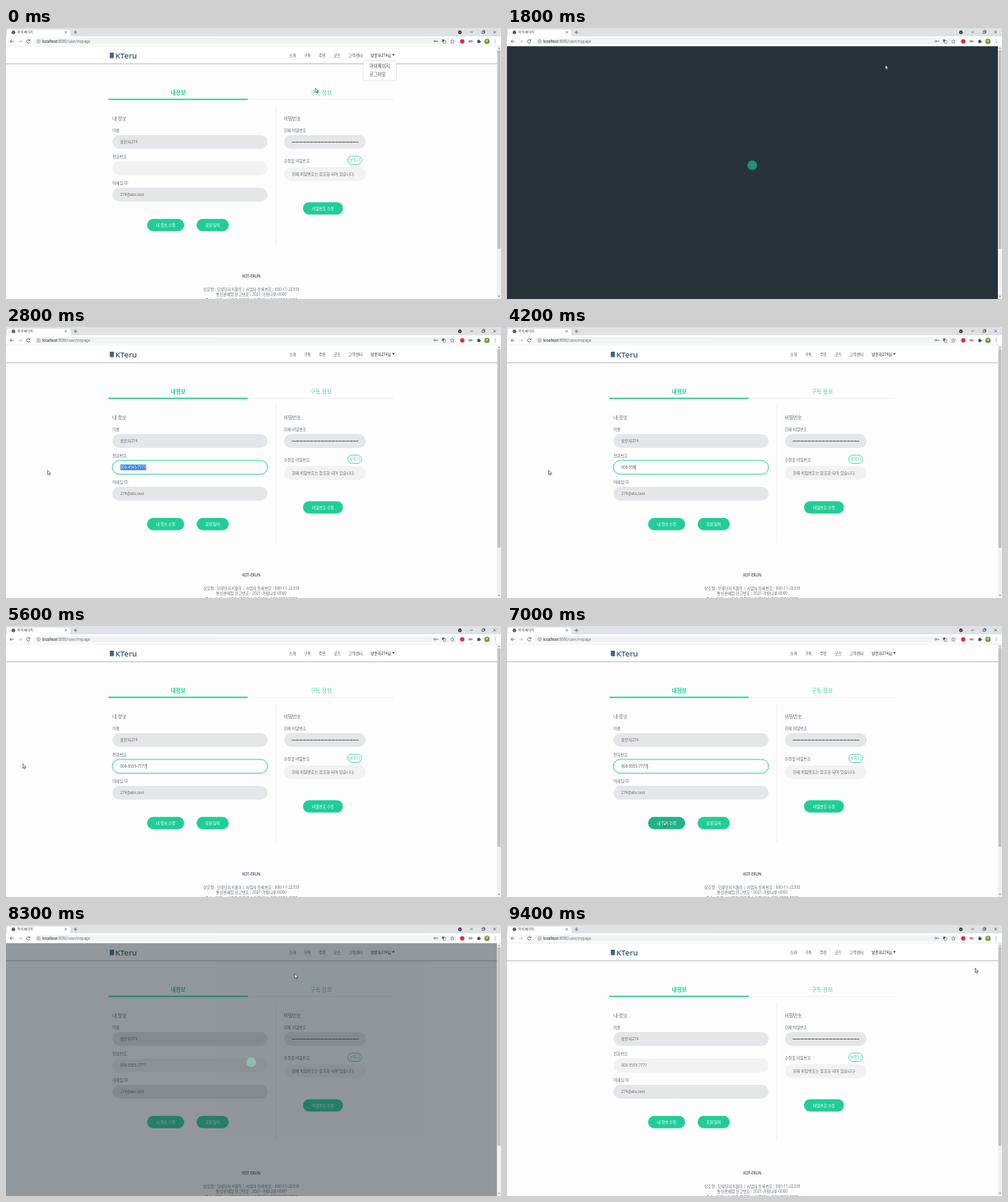
Write an HTML page that moves like this. It is 600 px wide and 329 px high and loops after 9500 ms.

```html
<!DOCTYPE html>
<html>
<head>
<meta charset="utf-8">
<title>마이페이지</title>
<style>
  html, body { margin: 0; width: 100%; height: 100%; overflow: hidden; background: #fdfdfd; }
  svg { display: block; width: 100vw; height: 100vh; }
  text { font-family: "Open Sans", "Noto Sans CJK KR", "Noto Sans CJK", sans-serif; white-space: pre; }
  .ui text { font-family: Roboto, "Noto Sans CJK KR", "Noto Sans CJK", sans-serif; }
</style>
</head>
<body>
<svg id="stage" viewBox="0 0 600 329" preserveAspectRatio="none"></svg>
<script>
const LOOP = 9500, STEP = 100;
const GREEN = '#20cd98', DARK_GREEN = '#1fb388', INK = '#626a76', GREY = '#e4e6ea', PALE = '#f2f2f2';
const OLD_PHONE = '000-4545-7777', NEW_PHONE = '000-5555-7777';

const text = (x, y, s, size = 4.7, fill = INK, extra = '') =>
  `<text x="${x}" y="${y}" font-size="${size}" fill="${fill}" ${extra}>${s}</text>`;
const mid = (x, y, s, size, fill, extra = '') => text(x, y, s, size, fill, 'text-anchor="middle" ' + extra);
const rect = (x, y, w, h, fill, extra = '') =>
  `<rect x="${x}" y="${y}" width="${w}" height="${h}" fill="${fill}" ${extra}/>`;
const pill = (x, y, w, h, fill, extra = '') => rect(x, y, w, h, fill, `rx="${h / 2}" ` + extra);
const dot = (x, y, r, fill, extra = '') => `<circle cx="${x}" cy="${y}" r="${r}" fill="${fill}" ${extra}/>`;
const line = (d, stroke = '#5f6368', w = 0.7, extra = '') =>
  `<path d="${d}" fill="none" stroke="${stroke}" stroke-width="${w}" ${extra}/>`;
const group = (id, body) => `<g id="${id}">${body}</g>`;
const button = (x, y, w, h, s, id = '') =>
  pill(x, y, w, h, GREEN, id && `id="${id}"`) + mid(x + w / 2, y + h / 2 + 1.7, s, 4.6, '#fff');

const header =
  rect(0, 22, 595, 21.2, '#fff') + rect(0, 42.9, 595, 0.9, '#b9bbbe') +
  rect(125.8, 30, 5, 6.6, '#3f6488') +
  text(132.6, 36.5, 'KTeru', 9.4, '#315378', 'font-weight="600"') +
  [[343, '소개'], [361, '구독'], [379, '주민'], [397, '굿즈'], [415, '고객센터']]
    .map(([x, s]) => text(x, 34.5, s, 4.75, '#50555d')).join('') +
  text(442, 34.5, '방문자274님', 4.6, '#202328', 'font-weight="500"') +
  '<path d="M468 31.8h3.2l-1.6 1.9z" fill="#222"/>';

const tabs =
  rect(124, 86.6, 346, 0.6, '#e3e5e7') + rect(124, 85.8, 169, 1.6, GREEN) +
  mid(208.8, 80.8, '내정보', 6.6, GREEN, 'font-weight="700"') +
  mid(382, 80.8, '구독 정보', 6.6, '#45d5aa');

const form =
  text(129, 112.2, '내 정보', 5.6) + text(129, 125.8, '이름') +
  pill(129, 130, 188, 16.8, GREY) + text(138.5, 140.2, '방문자274') +
  text(129, 157.6, '전화번호') +
  pill(129, 162, 188, 16.8, PALE, 'id="field"') +
  rect(138.5, 167, 0, 6.8, '#3a86e8', 'id="sel"') +
  text(138.5, 172.1, '', 4.5, INK, 'id="phone"') +
  rect(0, 167.3, 0.5, 6.2, '#222', 'id="caret"') +
  text(129, 189.6, '이메일 ID') +
  pill(129, 194, 188, 16.8, GREY) + text(138.5, 204.1, '274@abc.test', 4.6) +
  button(171, 231.8, 45, 15, '내 정보 수정', 'save') +
  button(231, 231.8, 39, 15, '회원 탈퇴') +
  rect(326.8, 94, 0.6, 168, '#e4e5e8');

const password =
  text(336.8, 112.2, '비밀번호', 5.6) + text(336.8, 125.8, '현재 비밀번호') +
  pill(337, 130, 99, 16.8, GREY) +
  line('M346.5 138.5H427', '#50555d', 1, 'stroke-dasharray="1.1 .2"') +
  text(336.8, 163.2, '수정할 비밀번호') +
  pill(414.3, 155.6, 16.8, 10, '#fff', `stroke="${GREEN}" stroke-width=".7"`) +
  mid(422.7, 162.2, '보이기', 4.6, GREEN) +
  pill(337, 169, 99, 16.8, PALE) +
  text(346.5, 179, '현재 비밀번호는 암호화 되어 있습니다.', 4.75) +
  button(360, 211.4, 48.4, 15, '비밀번호 수정');

const footer =
  mid(297.3, 302.6, 'KOT-ERUN', 4.5, '#47505c', 'font-weight="600"') +
  mid(297.3, 318.8, '상호명 : 모루단지 K풀이 | 사업자 등록번호 : 000-11-22333', 4.7, INK) +
  mid(297.3, 325.2, '통신판매업 신고번호 : 2021-가람나루-0000', 4.7, INK) +
  mid(297.3, 331.7, '주소 : 가람시 나루구 모루로 | 고객센터 : 000-0000-0000', 4.7, INK);

const menu =
  rect(433, 39.5, 40.3, 24.5, '#fff', 'rx="1" stroke="#d5d7da" stroke-width=".6"') +
  text(440.8, 47.8, '마이페이지', 5.3, '#3a3e44') + text(440.8, 58, '로그아웃', 5.3, '#3a3e44');

const key = x => dot(x - 1.3, 16, 1, 'none', 'stroke="#5f6368" stroke-width=".7"') + line(`M${x - 0.3} 16h2.7v1`);
const chrome =
  rect(0, 0, 600, 10.5, '#dee1e6') + '<path d="M1 10.5V4q0-2 2-2H76q2 0 2 2v6.5z" fill="#fff"/>' +
  rect(0, 10.2, 600, 11.8, '#fff') + rect(0, 21.7, 600, 0.5, '#d8dadd') +
  pill(34, 12.3, 512, 7.8, '#f1f3f4') +
  text(14, 6.7, '마이페이지', 4.1, '#45494d') +
  line('M71.2 3.8l2.6 2.6m0-2.6l-2.6 2.6M82 5.2h4.4M84.2 3v4.4', '#44474b', 0.6) +
  dot(550.2, 5.2, 2.2, '#33363a') + line('M549.2 4.8l1 1 1-1', '#fff', 0.5) +
  line('M562.5 5h3.4M577 4h2.6v2.6h-2.6zM578 4v-.9h2.5v2.6h-.9M590.8 3.5l3 3m0-3l-3 3', '#33363a', 0.6) +
  line('M9.4 16.2H4.9l2-2m-2 2l2 2', '#4c5054') +
  line('M14.8 16.2h4.5l-2-2m2 2l-2 2', '#b4b7bb') +
  dot(39.5, 16.2, 1.9, 'none', 'stroke="#5f6368" stroke-width=".5"') + line('M39.5 15.9v1.3m0-2.2v.4', '#5f6368', 0.5) +
  text(44, 17.7, '<tspan fill="#25282c">localhost</tspan>:8080/user/mypage', 4.5, '#74787d') +
  '<path d="M541 13.9l.7 1.5 1.6.2-1.2 1.1.3 1.6-1.4-.8-1.4.8.3-1.6-1.2-1.1 1.6-.2z" fill="none" stroke="#5f6368" stroke-width=".5"/>' +
  dot(553, 16.2, 2.6, '#dd2a36') +
  dot(562, 16.2, 1, 'none', 'stroke="#444" stroke-width=".6"') + dot(564.3, 16.2, 1, 'none', 'stroke="#444" stroke-width=".6"') +
  rect(571.4, 15, 3.2, 3.2, '#44484c', 'rx=".4"') + dot(573, 14.8, 0.8, '#44484c') + dot(574.8, 16.6, 0.8, '#44484c') +
  dot(583, 16.2, 3.2, '#689f38') + mid(583, 17.4, 'M', 3.2, '#fff') +
  [14.4, 16.2, 18].map(y => dot(593, y, 0.5, '#5f6368')).join('') +
  group('ready',
    dot(9, 5.2, 2.2, '#4a4d52') + line('M7.5 4.4q1.2 1 1.2 2.1M9.6 3.6q0 1.2 1.2 1.4', '#c9cccf', 0.5) +
    line('M28.7 15a2.1 2.1 0 1 0 .3 1.8M29 13.7v1.7h-1.7', '#4c5054') +
    key(521) + rect(528.6, 14, 2.8, 3.2, '#5f6368') +
    rect(530.4, 15.3, 2.6, 3, '#fff', 'stroke="#5f6368" stroke-width=".5"')) +
  group('busy',
    line('M9 3.2a2 2 0 0 1 2 2', '#6b7076', 0.7, 'id="spin"') +
    line('M25.3 14.6l3.2 3.2m0-3.2l-3.2 3.2', '#4c5054') + key(530.5));

const scrollbar =
  rect(595, 22, 5, 307, '#f1f1f1') + rect(595.7, 27, 3.7, 241, '#c1c1c1') +
  '<path d="M596.3 25.4h2.6l-1.3-1.5zM596.3 325.2h2.6l-1.3 1.5z" fill="#777"/>';

const loader = rect(0, 22, 595, 307, '#263238') +
  dot(297.3, 166.6, 6, GREEN, 'id="b1" opacity=".6"') + dot(297.3, 166.6, 6, GREEN, 'id="b2" opacity=".6"');

const pointer =
  '<path id="arrow" d="M0 0v5.2l1.2-1.1.8 1.9.9-.4-.8-1.8h1.7z" fill="#fff" stroke="#111" stroke-width=".5"/>' +
  line('M-1 -2.6h2M0 -2.6v5.2M-1 2.6h2', '#222', 0.5, 'id="beam"');

document.getElementById('stage').innerHTML =
  rect(0, 0, 600, 329, '#fdfdfd') + header + tabs + form + password + footer +
  group('menu', menu) + group('cover', loader) + scrollbar + `<g class="ui">${chrome}</g>` + group('mouse', pointer);

const $ = id => document.getElementById(id);
const set = (id, attrs) => { for (const k in attrs) $(id).setAttribute(k, attrs[k]); };
const show = (id, on) => $(id).style.display = on ? '' : 'none';
const clamp = v => Math.max(0, Math.min(1, v));
const ease = p => 0.5 - Math.cos(Math.PI * clamp(p)) / 2;

// time, x, y of the pointer tip
const path = [
  [0, 375, 73], [250, 392, 68], [700, 452, 45], [1200, 452, 45], [1700, 458.5, 45], [2000, 458.5, 45],
  [2400, 171, 170], [2700, 50.5, 174], [5100, 50.5, 174], [5500, 20.5, 167.5], [6200, 20.5, 167.5],
  [6900, 190, 238], [7400, 190, 238], [7900, 351, 54.5], [8100, 351, 54.5], [8300, 350, 59.5],
  [8600, 350, 59.5], [9300, 567.5, 52.5], [9500, 567.5, 52.5]
];
function mouseAt(t) {
  const i = path.findIndex(k => k[0] > t), [t0, x0, y0] = path[i - 1], [t1, x1, y1] = path[i];
  const p = ease((t - t0) / (t1 - t0));
  return [x0 + (x1 - x0) * p, y0 + (y1 - y0) * p];
}

// page loads: request sent, page shown, cover starts to fade, cover gone
const loads = [[1150, 1650, 1850, 2250], [7500, 8150, 8150, 8450]];

function draw(t) {
  const [x, y] = mouseAt(t);
  set('mouse', { transform: `translate(${x} ${y})` });
  const overField = x > 131 && x < 315 && y > 162 && y < 179;
  show('arrow', !overField);
  show('beam', overField);

  const busy = loads.some(l => t >= l[0] && t < l[1]);
  show('busy', busy);
  show('ready', !busy);
  set('spin', { transform: `rotate(${t * 0.36} 9 5.2)` });

  const load = loads.find(l => t >= l[1] && t < l[3]);
  show('cover', !!load);
  if (load) {
    const age = (t - load[1]) / 1000;
    set('cover', { opacity: 1 - ease((t - load[2]) / (load[3] - load[2])) });
    set('b1', { r: 6.25 * ease(age) });
    set('b2', { r: 6.25 * (1 - ease(age)) });
  }
  show('menu', t < 1150);

  const focus = t >= 2400 && t < 7400, chosen = t >= 2400 && t < 3200;
  const typed = Math.floor((t - 3200) / 130);
  $('phone').textContent = t < 1650 ? '' : t < 3200 ? OLD_PHONE : NEW_PHONE.slice(0, typed);
  const len = $('phone').textContent ? $('phone').getComputedTextLength() : 0;
  const shade = focus ? Math.round(242 + 13 * clamp((t - 2400) / 500)) : 242;
  set('field', {
    fill: `rgb(${shade},${shade},${shade})`,
    stroke: focus ? GREEN : 'none', 'stroke-width': 0.9
  });
  const from = Math.max(138.5, Math.min(138.5 + len, x));
  set('sel', { x: from, width: chosen ? 138.5 + len - from : 0 });
  set('phone', { fill: chosen && from < 140 ? '#fff' : focus ? '#444b55' : INK });
  set('caret', { x: 138.7 + len });
  show('caret', focus && !chosen && (typed <= 13 || Math.floor((t - 5500) / 530) % 2 === 0));

  const hover = (x > 171 && x < 216 && y > 232 && y < 247) || (t >= 7400 && t < 8150);
  set('save', { fill: hover ? DARK_GREEN : GREEN });
}

const start = performance.now();
function tick() {
  const t = (performance.now() - start) % LOOP;
  draw(Math.floor(t / STEP) * STEP);
  requestAnimationFrame(tick);
}
tick();
</script>
</body>
</html>
```
